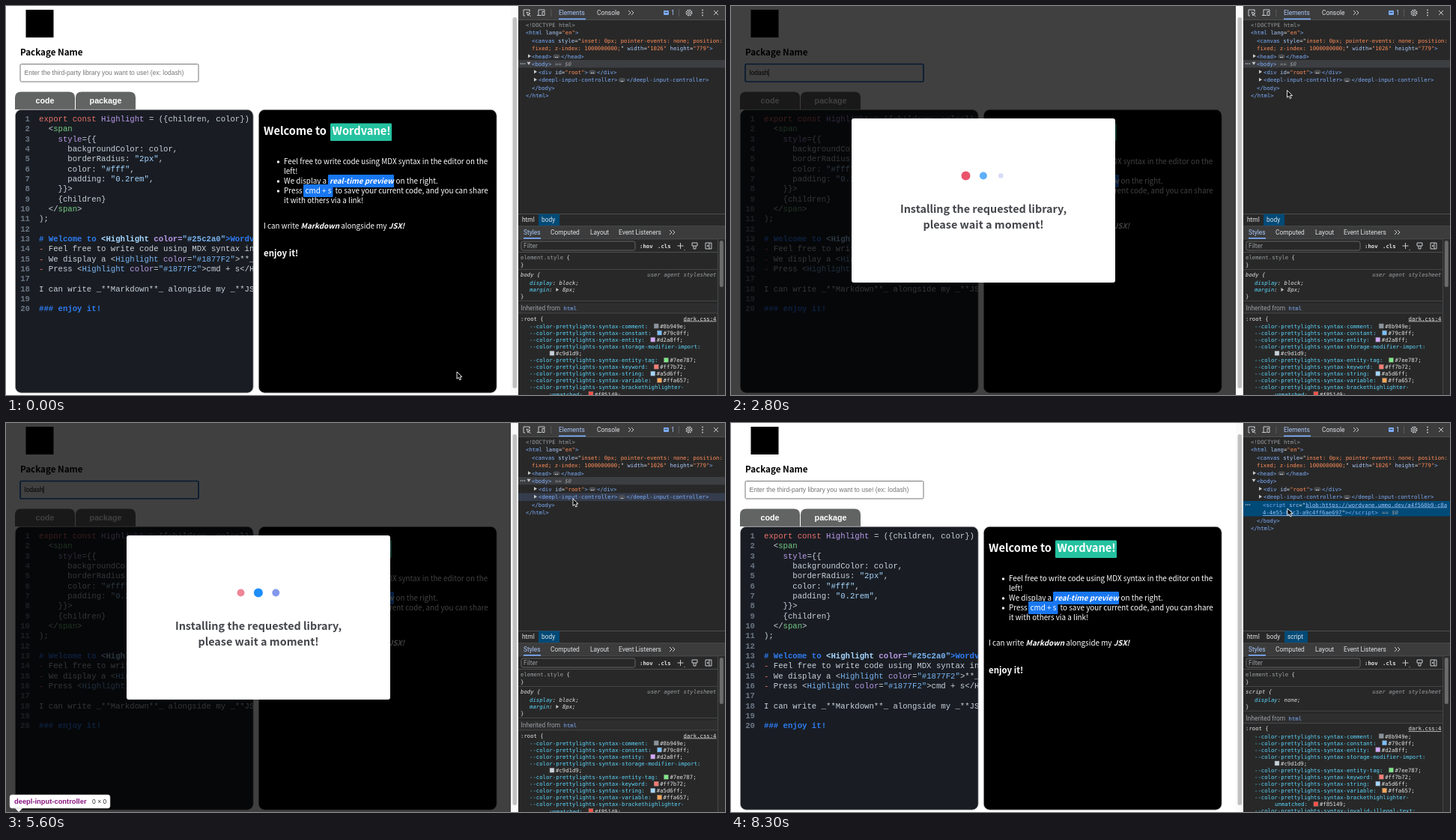
Animation of 960x519 px, one loop 8.88 s. Source, as an HTML page:

```html
<!DOCTYPE html>
<html lang="en">
<head>
<meta charset="utf-8">
<title>Package install demo</title>
<style>
html, body { margin: 0; width: 100%; height: 100%; overflow: hidden; background: #fff; }
svg { display: block; width: 100vw; height: 100vh; }
text { white-space: pre; }
.ui { font: 8.4px Roboto, sans-serif; fill: #dfe1e5; }
.arial { font: 8.55px "Liberation Sans", Arial, sans-serif; }
.tab { font: bold 10.7px "Liberation Sans", Arial, sans-serif; fill: #fff; }
.code { font: 10.65px "Liberation Mono", monospace; fill: #c9d1d9; }
.num { font-weight: bold; fill: #6b7684; text-anchor: end; }
.prose, .title, .label, .modal { font-family: "Noto Sans CJK KR", "Noto Sans CJK JP", "Noto Sans CJK", "Noto Sans", sans-serif; }
.prose { font-size: 9.87px; fill: #fff; }
.title { font-size: 14.65px; font-weight: bold; fill: #fff; }
.label { font-size: 11.6px; font-weight: bold; }
.modal { font-size: 14.4px; font-weight: bold; fill: #44464b; text-anchor: middle; }
.dev { font: 7.3px "DejaVu Sans Mono", monospace; fill: #e3e3e3; }
.end { text-anchor: end; }
.b { font-weight: bold; }
.i { font-style: italic; }
.bi { font-weight: bold; font-style: italic; }
.key { fill: #e8706a; }
.fn { fill: #b99ae8; }
.tag { fill: #74c982; }
.str { fill: #a5d6ff; }
.attr { fill: #79b4f2; }
.head { fill: #2f7bf0; font-weight: bold; }
.el { fill: #7cacf8; }
.at { fill: #a8c7fa; }
.val { fill: #fe8d59; }
.link { fill: #9dc1fb; text-decoration: underline; }
.dim { fill: #9a9da1; }
.prop { fill: #5cd5fb; }
.icon { fill: none; stroke: #c7c9cc; stroke-width: 1; }
</style>
</head>
<body>
<svg id="stage" viewBox="0 0 960 519" preserveAspectRatio="none"></svg>
<script>
const LOOP = 8880, LAST = 8300;
const CHAR = 7.3 * .602;

const escape = s => s.replace(/&/g, '&amp;').replace(/</g, '&lt;').replace(/>/g, '&gt;');
// ‹class|words› styles a run inside a line of text
const runs = s => escape(s).replace(/‹([\w ]+)\|(.*?)›/g, '<tspan class="$1">$2</tspan>');
const text = (cls, x, y, s) => `<text class="${cls}" x="${x}" y="${y}">${runs(s)}</text>`;
const rect = (x, y, w, h, fill, r = 0, more = '') =>
  `<rect x="${x}" y="${y}" width="${w}" height="${h}" rx="${r}" fill="${fill}" ${more}/>`;
const path = (d, more = 'class="icon"') => `<path d="${d}" ${more}/>`;
const group = (id, ...parts) => `<g id="${id}">${parts.join('')}</g>`;
const panel = (x, fill) => rect(x + .3, 138.3, 317.9, 377.9, fill, 8, 'stroke="#c8c8c8" stroke-width=".700"');

function page() {
  const tab = (x, name) =>
    path(`M${x} 138V122.500q0-8 8-8h64q8 0 8 8V138z`, 'fill="#626463"') +
    `<text class="tab" x="${x + 40}" y="129.500" text-anchor="middle">${name}</text>`;
  return rect(0, 0, 684, 519, '#fff') +
    rect(26.5, 5, 37, 37, '#000') +
    text('label', 19, 66, 'Package Name') +
    group('field', rect(19, 77.5, 238, 23.5, '#fff', 1.5, 'id="box"'),
      '<text id="typed" class="arial" x="24.500" y="92"></text>',
      rect(0, 84, .8, 10, '#000', 0, 'id="caret"')) +
    tab(12, 'code') + tab(93, 'package');
}

function editor() {
  const lines = [
    '‹key|export const› ‹fn|Highlight› = ({children, color}) => (',
    '  <‹tag|span›',
    '    ‹fn|style›={{',
    '      backgroundColor: color,',
    '      borderRadius: ‹str|"2px"›,',
    '      color: ‹str|"#fff"›,',
    '      padding: ‹str|"0.2rem"›,',
    '    }}>',
    '    {children}',
    '  </‹tag|span›>',
    ');', '',
    '‹head|# Welcome to ›‹b str|<Highlight ›‹b fn|color=›‹b attr|"#25c2a0"›‹head|>Wordvane›',
    '‹key|-› Feel free to write code using MDX syntax in',
    '‹key|-› We display a <‹attr|Highlight› ‹fn|color›=‹attr|"#1877F2"›>**_real',
    '‹key|-› Press <‹attr|Highlight› ‹fn|color›=‹attr|"#1877F2"›>cmd + s</High', '',
    'I can write _**Markdown**_ alongside my _**JSX', '',
    '‹head|### enjoy it!›'];
  const rows = lines.map((line, i) => {
    const y = 154 + i * 13.33;
    return text('code num', 32, y, `${i + 1}`) + text('code', 44, y, line);
  });
  return '<clipPath id="edge"><rect x="12" y="138" width="318" height="379"/></clipPath>' +
    panel(12, '#191d23') + `<g clip-path="url(#edge)">${rows.join('')}</g>`;
}

function preview() {
  const bullet = y => `<circle cx="363.500" cy="${y}" r="1.700" fill="#fff"/>`;
  return panel(337, '#000') +
    text('title', 344, 172, 'Welcome to') +
    rect(433, 156.5, 82, 23.5, '#25c2a0', 1.3) + text('title', 435.5, 172, 'Wordvane!') +
    bullet(208) + bullet(234) + bullet(247) +
    text('prose', 371, 210.5, 'Feel free to write code using MDX syntax in the editor on the') +
    text('prose', 371, 223.5, 'left!') +
    text('prose', 371, 236.5, 'We display a') +
    rect(430, 225, 88, 17, '#1877f2', 1.3) + text('prose bi', 432, 236.5, 'real-time preview') +
    text('prose', 520.5, 236.5, 'on the right.') +
    text('prose', 371, 249.5, 'Press') +
    rect(397, 238, 39.5, 17, '#1877f2', 1.3) + text('prose', 399.5, 249.5, 'cmd + s') +
    text('prose', 439.5, 249.5, 'to save your current code, and you can share') +
    text('prose', 371, 262.5, 'it with others via a link!') +
    text('prose', 344, 297, 'I can write ‹bi|Markdown› alongside my ‹bi|JSX!›') +
    `<text class="title" style="font-size:11.45px" x="344" y="334">enjoy it!</text>`;
}

function modal() {
  return group('modal', rect(0, 0, 674, 519, '#000', 0, 'opacity=".75"'),
    rect(161, 150, 352, 219, '#fff', 3),
    ...['#e9546b', '#1e8efb', '#4f6ce2'].map((color, i) =>
      `<circle class="dot" cx="${313.5 + i * 23.4}" cy="226.500" fill="${color}"/>`),
    text('modal', 337, 276, 'Installing the requested library,'),
    text('modal', 337, 297, 'please wait a moment!'));
}

function overlays() {
  const outline = (x, y, w, h) => rect(x, y, w, h, 'none', 0, 'stroke="#9ccfbd" stroke-width="1.200"');
  return group('outlines', outline(5, -3, 663, 110), outline(18.5, 4.5, 53, 37),
      outline(18.5, 54.5, 83, 15), outline(19, 77.5, 238, 23.5)) +
    group('tooltip', path('M11 513h12l-6 6z', 'fill="#fff"'),
      rect(5, 496, 134, 18, '#fff', 3, 'stroke="#bbb" stroke-width=".600"'),
      '<text class="arial b" style="font-size:9.35px;fill:#881280" x="11" y="508">deepl-input-controller</text>',
      '<text class="arial" x="115" y="508" fill="#333">0 × 0</text>');
}

function toolbars() {
  const line = y => rect(684, y, 276, .8, '#55585c');
  const chevrons = (x, y) => path(`M${x} ${y - 3}l3 3-3 3m4-6l3 3-3 3`);
  return rect(684, 0, 276, 519, '#282828') + rect(684, 0, 276, 18, '#3c3c3c') + line(18) +
    path('M699 6V5h-8v8h2m6-5V5M695 8l5 2-2 1-1 2zM697.500 11l3 3') +
    path('M711 12V5h8v2m-10 5.500h6m1-5h3v5h-3z') + rect(727.5, 4, .8, 10, '#5f6368') +
    text('ui', 738, 12, '‹at|Elements›') + rect(738, 16.5, 36, 1.7, '#7cacf8') +
    text('ui', 789, 12, 'Console') + chevrons(831, 9) +
    rect(878, 6, 7, 6, '#7cacf8', 1) + rect(879.5, 8, 4, .8, '#282828') + text('ui', 888, 12, '‹at|1›') +
    rect(898, 4, .8, 10, '#5f6368') +
    '<circle cx="912" cy="9" r="3.600" class="icon" style="stroke-width:1.600" stroke-dasharray="2 .8"/>' +
    '<circle cx="912" cy="9" r="1.500" class="icon"/>' +
    [5.5, 9, 12.5].map(y => `<circle cx="930" cy="${y}" r=".900" fill="#c7c9cc"/>`).join('') +
    path('M945 6l6 6m0-6l-6 6') +
    line(277) + line(293) + text('ui', 689, 288, 'html') +
    rect(711, 277.5, 28, 15.5, '#004a77', 0, 'id="crumbBody"') + text('ui', 715, 288, 'body') +
    group('crumbScript', rect(739, 277.5, 31, 15.5, '#004a77'), text('ui', 743, 288, 'script')) +
    rect(684, 293.5, 276, 17, '#3c3c3c') + line(310.5) +
    text('ui', 691, 305, '‹at|Styles›') + rect(691, 309, 23, 1.7, '#7cacf8') +
    text('ui', 727, 305, 'Computed') + text('ui', 780, 305, 'Layout') +
    text('ui', 818, 305, 'Event Listeners') + chevrons(886, 302) +
    rect(688, 314, 152, 12, '#282828', 2.5, 'stroke="#757575" stroke-width=".800"') +
    text('ui', 691, 323, '‹dim|Filter›') +
    text('dev b', 846, 322.5, ':hov') + text('dev b', 870, 322.5, '.cls') +
    path('M896.500 320h8m-4-4v8m5 1.500h1') + path('M916 316h7v4h-7zM918 320v4h3v-4') +
    path('M934 316h8v8h-8zm5 0v8m-1-5l-2 1 2 1') + line(328);
}

function tree() {
  const pill = (x, y) => rect(x, y - 5, 9, 5.5, '#4a4d51', 2.7) + text('dev', x + 2.3, y - .5, '…');
  const arrow = (x, y) => path(`M${x} ${y - 5.2}v5l4-2.500z`, 'fill="#c7c9cc"');
  const more = y => [0, 2.5, 5].map(d => `<circle cx="${687.5 + d}" cy="${y}" r=".800" fill="#c7c9cc"/>`).join('');
  const flash = (x, y, n) => rect(x, y - 6.5, n * CHAR, 8.5, '#6486b6', 0, 'class="flash"');
  return rect(684, 72, 276, 10.3, '#3d3e42', 0, 'id="bodyRow"') +
    rect(684, 93.5, 276, 10.5, '#353c4c', 0, 'id="hoverRow"') +
    rect(684, 104, 276, 20.5, '#004a77', 0, 'id="scriptRow"') +
    text('dev', 694, 27.5, '‹dim|<!DOCTYPE html>›') +
    text('dev', 694, 38, '‹el|<html› ‹at|lang›=‹val|"en"›‹el|>›') +
    text('dev', 702, 48.5, '‹el|<canvas› ‹at|style›="‹val|inset: 0px; pointer-events: none; position:›') +
    text('dev', 702, 59, '‹val|fixed; z-index: 1000000000;›" ‹at|width›=‹val|"1026"› ‹at|height›=‹val|"779"›‹el|>›') +
    arrow(697, 69.5) + text('dev el', 702, 69.5, '<head>') + pill(730.5, 69.5) + text('dev el', 741, 69.5, '</head>') +
    path('M695.500 74.800h5l-2.500 4z', 'fill="#c7c9cc"') + text('dev el', 702, 79.8, '<body>') +
    group('bodyMark', more(77), text('dev i dim', 733, 79.8, '== $0')) +
    flash(715.4, 90.5, 3) + arrow(705, 90.5) +
    text('dev', 711, 90.5, '‹el|<div› ‹at|id›=‹val|"root"›‹el|>›') + pill(778.5, 90.5) + text('dev el', 789, 90.5, '</div>') +
    arrow(705, 101) + text('dev el', 711, 101, '<deepl-input-controller>') + pill(818, 101) +
    text('dev el', 828.5, 101, '</deepl-input-controller>') +
    group('script', flash(714.4, 111.5, 6),
      text('dev', 710, 111.5, '‹el|<script› ‹at|src›="‹link|blob:https://wordvane.ummo.dev/a4f560b9-c8a›'),
      text('dev', 710, 122, '‹link|4-4e55-b2c3-a9c4ff6ae697›"‹el|></script›‹el|>›')) +
    group('scriptMark', more(109), text('dev i dim', 869, 122, '== $0')) +
    group('closing', text('dev el', 702, 111.5, '</body>'), text('dev el', 694, 122, '</html>'));
}

function styles() {
  const line = y => rect(684, y, 266, .7, '#505357');
  const vars = [['comment', '8b949e'], ['constant', '79c0ff'], ['entity', 'd2a8ff'],
    ['storage-modifier-import', 'c9d1d9', ''], ['entity-tag', '7ee787'], ['keyword', 'ff7b72'],
    ['string', 'a5d6ff'], ['variable', 'ffa657'], ['brackethighlighter-', 'f85149', 'unmatched:'],
    ['invalid-illegal-text', '']];
  let y = 430, list = '';
  for (const [name, hex, wrapped] of vars) {
    let label = `--color-prettylights-syntax-${name}${wrapped ? '' : ':'}`, x = 699;
    list += text('dev prop', x, y, label);
    if (wrapped !== undefined) {
      y += 9.05;
      x = 726;
      label = wrapped;
      list += text('dev prop', x, y, label);
    }
    x += label.length * CHAR + (label ? 8 : 0);
    if (hex) list += rect(x, y - 6, 6, 6, '#' + hex, 0, 'stroke="#777" stroke-width=".500"') +
      text('dev', x + 8, y, `#${hex};`);
    y += 9.05;
  }
  return text('dev', 687, 337.5, '‹dim|element.style› {') + text('dev', 687, 347.5, '}') + line(351) +
    text('dev i dim end', 948.5, 361, 'user agent stylesheet') +
    group('bodyRule', text('dev i', 687, 361, 'body {'), text('dev i', 699, 371.5, '‹prop|display›: block;'),
      text('dev i', 699, 381, '‹prop|margin›:   8px;'), path('M734.500 376v5l3.500-2.500z', 'fill="#c7c9cc"'),
      text('dev', 687, 390, '}')) +
    group('scriptRule', text('dev i', 687, 361, 'script {'), text('dev i', 699, 371.5, '‹prop|display›: none;'),
      text('dev', 687, 381, '}')) +
    group('inherited', line(393), rect(684, 397, 266, 12.5, '#2e2e2f'),
      text('ui dim', 687.5, 406, 'Inherited from'), text('dev el', 744.5, 406, 'html'), line(409.5),
      text('dev', 687, 419.5, ':root {'),
      '<text class="dev end" x="948.500" y="419.500" text-decoration="underline">dark.css:4</text>', list) +
    rect(950, 311, 10, 208, '#2c2c2c') + rect(950, 311, .7, 208, '#505357') +
    rect(952.8, 313, 5, 62, '#6b6b6b', 2.5);
}

const stage = document.getElementById('stage');
stage.innerHTML = page() + editor() + preview() + modal() + overlays() +
  rect(674, 0, 10, 519, '#fafafa') + rect(676.5, 15, 5.5, 495, '#c1c1c1', 2.7) +
  toolbars() + tree() + styles() +
  path('M0 0V9.500L2.200 7.500 3.800 11 5.500 10.200 4 6.900H7z',
    'id="cursor" fill="#000" stroke="#fff" stroke-width=".900"');

const get = id => document.getElementById(id);
const show = (id, on) => { get(id).style.display = on ? '' : 'none'; };
const set = (node, attrs) => { for (const k in attrs) node.setAttribute(k, attrs[k]); };
const dots = [...document.querySelectorAll('.dot')];
const flashes = [...document.querySelectorAll('.flash')];

// time, x, y
const route = [[0, 602, 488], [100, 602, 488], [700, 62, 90], [1800, 62, 90], [2500, 728, 124],
  [2600, 728, 124], [3000, 757, 101], [7200, 757, 101], [7700, 743, 114], [LAST, 743, 114]];

function cursorAt(t) {
  const i = Math.max(1, route.findIndex(p => p[0] >= t));
  const [t0, x0, y0] = route[i - 1], [t1, x1, y1] = route[i];
  const p = (t - t0) / (t1 - t0), e = p * p * (3 - 2 * p);
  return `translate(${x0 + (x1 - x0) * e} ${y0 + (y1 - y0) * e})`;
}

function draw(t) {
  const loading = t >= 1800 && t < 6900, installed = t >= 6900, selected = t >= 7900;
  const focused = t >= 700 && !selected;
  const word = installed ? '' : 'lodash'.slice(0, Math.max(0, Math.floor((t - 900) / 100)));

  const typed = get('typed');
  typed.textContent = word || 'Enter the third-party library you want to use! (ex: lodash)';
  typed.setAttribute('fill', word ? '#000' : '#757575');
  set(get('box'), { stroke: focused ? '#1563c5' : '#767676', 'stroke-width': focused ? 1.7 : 1 });
  const typing = t >= 1000 && t < 1800;
  show('caret', focused && (typing || (t + 400) % 1000 < 500));
  get('caret').setAttribute('x', word ? 24.5 + typed.getComputedTextLength() : 24.7);

  show('modal', loading);
  dots.forEach((dot, i) => {
    const pulse = (1 + Math.cos(2 * Math.PI * ((t - 5600) / 667 + (1 - i) * .2))) / 2;
    set(dot, { r: 3 + 3 * pulse, opacity: .15 + .85 * pulse });
  });

  const overScript = t >= 7500;
  show('outlines', installed && t < 7200);
  show('tooltip', t >= 2900 && !overScript);
  show('hoverRow', t >= 2900 && !selected);
  set(get('hoverRow'), overScript ? { y: 104, height: 20.5 } : { y: 93.5, height: 10.5 });
  show('script', installed);
  flashes.forEach(f => f.setAttribute('opacity', installed ? Math.max(0, .7 * (1 - (t - 6900) / 900)) : 0));
  get('closing').setAttribute('transform', `translate(0 ${installed ? 21 : 0})`);

  for (const id of ['bodyRow', 'bodyMark', 'bodyRule', 'crumbBody']) show(id, !selected);
  for (const id of ['scriptRow', 'scriptMark', 'scriptRule', 'crumbScript']) show(id, selected);
  get('inherited').setAttribute('transform', `translate(0 ${selected ? -9.2 : 0})`);

  show('cursor', t < 1000 || t > 1800);
  get('cursor').setAttribute('transform', cursorAt(t));
}

function tick() {
  const t = performance.now() % LOOP;
  draw(Math.min(LAST, Math.floor(t / 100) * 100));
  requestAnimationFrame(tick);
}
tick();
</script>
</body>
</html>
```
